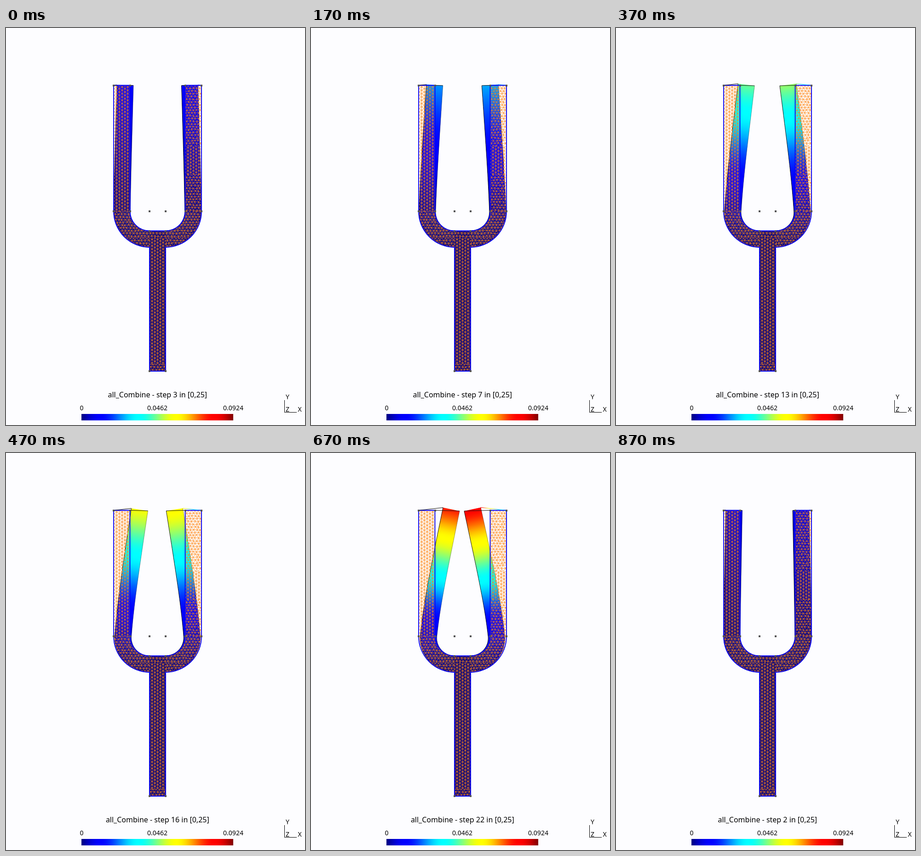
Recreate the animation shown at these times as an HTML page with a canvas. Size 650 by 862 pixels, loop 910 ms.

```html
<!DOCTYPE html>
<html>
<head>
<meta charset="utf-8">
<style>
  html, body { margin: 0; width: 100%; height: 100%; overflow: hidden; background: #fdfdff; }
  canvas { display: block; }
</style>
</head>
<body>
<canvas id="stage" width="650" height="862"></canvas>
<script>
const W = 650, H = 862, LOOP = 910, STEPS = 26;
const TOP = 124.5, BEND = 398, JOIN = 476.5, FOOT = 745, ARM = BEND - TOP;
const RADIUS = 60, HALF = 18, CENTER = 311.8, MIRROR = 659;
const LEFT_PEAK = 60.4, RIGHT_PEAK = 63.8, MAX_SHIFT = 64.5;
const ARM_SIDE = ARM / 38, STEM_SIDE = (FOOT - JOIN) / 38;
const FONT = '"Noto Sans", "Open Sans", sans-serif';
const ctx = document.getElementById('stage').getContext('2d');

// Jet colours with softened ramps, so that cyan and yellow form broad bands.
function jet(v) {
  const channel = peak => {
    const k = Math.max(0, Math.min(1, 1.5 - Math.abs(4 * v - peak)));
    return Math.round(255 * k * k * (3 - 2 * k));
  };
  return `rgb(${channel(3)},${channel(2)},${channel(1)})`;
}

function jetGradient(c, x0, x1, from, to) {
  const g = c.createLinearGradient(x0, 0, x1, 0);
  for (let i = 0; i <= 64; i++) g.addColorStop(i / 64, jet(from + (to - from) * i / 64));
  return g;
}

function line(c, points, color, width = 1) {
  c.beginPath();
  points.forEach(p => c.lineTo(...p));
  c.strokeStyle = color;
  c.lineWidth = width;
  c.stroke();
}

// A bending beam on a bending arc: q runs 0..1 along the arc and 1..2 up the
// arm; offset points inward.
function prong(q, offset, amp, right) {
  const BASE_TURN = 0.537, FLEX = 0.389;
  const bend = Math.min(q, 1), s = Math.max(q - 1, 0), a = bend * Math.PI / 2;
  const sin = Math.sin(a), cos = Math.cos(a);
  const sway = BASE_TURN * amp / ARM / (Math.PI / 2) * RADIUS;
  const beam = (6 * s ** 2 - 4 * s ** 3 + s ** 4) / 3;
  const slope = (12 * s - 12 * s ** 2 + 4 * s ** 3) / 3;
  const turn = amp / ARM * (BASE_TURN * bend + FLEX * slope);
  const ox = offset * sin, oy = -offset * cos;
  const ux = sway * (sin - a * cos) + amp * (BASE_TURN * s + FLEX * beam) - turn * oy;
  const uy = -sway * (a * sin + cos - 1) + turn * ox;
  const x = CENTER - RADIUS * sin + ox + ux;
  const y = BEND + RADIUS * cos - ARM * s + oy + uy;
  return { at: [right ? MIRROR - x : x, y], shift: Math.hypot(ux, uy) };
}

function drawProng(amp, right) {
  const at = (q, offset) => prong(q, offset, amp, right).at;
  const n = 240;
  for (let i = 0; i < n; i++) {
    const q0 = 2 * i / n, q1 = Math.min(2, q0 + 3 / n);
    ctx.beginPath();
    [[q0, -HALF], [q1, -HALF], [q1, HALF], [q0, HALF]].forEach(p => ctx.lineTo(...at(...p)));
    ctx.fillStyle = jet(prong(q0 + 1 / n, 0, amp, right).shift / MAX_SHIFT);
    ctx.fill();
  }
  const edge = offset => Array.from({ length: 61 }, (_, i) => at(i / 30, offset));
  const faint = 'rgba(0,0,0,.4)';
  line(ctx, edge(-HALF), right ? faint : '#000', 0.9);
  line(ctx, edge(HALF), right ? '#000' : faint, 0.9);
}

function drawTipLinks(amp, right) {
  for (const offset of [-HALF, HALF]) {
    const from = prong(2, offset, 0, right).at;
    const to = prong(2, offset, amp, right).at;
    const colored = right && offset < 0 && amp > 1;
    const color = colored
      ? jetGradient(ctx, to[0], from[0], amp / MAX_SHIFT, 0.2) : '#111';
    line(ctx, [from, to], color);
  }
}

function forkPath(c) {
  const l = 312, r = 347;
  c.beginPath();
  c.moveTo(234, TOP);
  c.lineTo(234, BEND);
  c.arc(l, BEND, 78, Math.PI, Math.PI / 2, true);
  c.lineTo(l, FOOT);
  c.lineTo(r, FOOT);
  c.lineTo(r, 476);
  c.arc(r, BEND, 78, Math.PI / 2, 0, true);
  c.lineTo(425, TOP);
  c.lineTo(389.5, TOP);
  c.lineTo(389.5, BEND);
  c.arc(r, BEND, 42.5, 0, Math.PI / 2);
  c.lineTo(l, 440.5);
  c.arc(l, BEND, 42.5, Math.PI / 2, Math.PI);
  c.lineTo(269.5, TOP);
  c.closePath();
}

function noise(n) {
  const v = Math.sin(n * 12.9898) * 43758.5453;
  return v - Math.floor(v) - 0.5;
}

// Triangle lattice filling a box, with its lines running down or across.
function lattice(c, x0, y0, x1, y1, { upright = false, jitter = 0, side = ARM_SIDE }) {
  const gap = 6;
  const [across, along] = upright ? [x1 - x0, y1 - y0] : [y1 - y0, x1 - x0];
  const node = (i, j) => {
    const seed = i * 71 + j * 13 + x0;
    const u = i * gap + jitter * noise(seed);
    const v = (j + (i & 1) / 2) * side + jitter * noise(seed + 0.37);
    return upright ? [x0 + u, y0 + v] : [x0 + v, y0 + u];
  };
  c.save();
  c.beginPath();
  c.rect(x0, y0, x1 - x0, y1 - y0);
  c.clip();
  c.beginPath();
  for (let i = 0; i <= across / gap + 1; i++) {
    for (let j = -1; j <= along / side + 1; j++) {
      const slanted = i & 1 ? j + 1 : j - 1;
      for (const other of [[i, j + 1], [i + 1, j], [i + 1, slanted]]) {
        c.moveTo(...node(i, j));
        c.lineTo(...node(...other));
      }
    }
  }
  c.strokeStyle = '#ff8614';
  c.lineWidth = 0.85;
  c.stroke();
  c.restore();
}

function makeOverlay() {
  const layer = document.createElement('canvas');
  layer.width = W;
  layer.height = H;
  const c = layer.getContext('2d');
  const rough = { jitter: 2.2 };
  const stemTop = JOIN - 3 * STEM_SIDE;
  c.save();
  forkPath(c);
  c.clip();
  lattice(c, 234.5, TOP, 270, BEND, { upright: true });
  lattice(c, 389.5, TOP, 425, 256, rough);
  lattice(c, 389.5, 256, 425, 318, { upright: true, jitter: 0.5 });
  lattice(c, 389.5, 318, 425, BEND, rough);
  lattice(c, 234, BEND, 425, stemTop, rough);
  lattice(c, 234, stemTop, 312, JOIN, rough);
  lattice(c, 347, stemTop, 425, JOIN, rough);
  lattice(c, 311.5, stemTop, 347.5, 730, { upright: true, side: STEM_SIDE });
  lattice(c, 311.5, 730, 347.5, FOOT, rough);
  c.restore();
  forkPath(c);
  c.strokeStyle = '#00f';
  c.lineWidth = 1.8;
  c.stroke();
  return layer;
}

function drawPoints() {
  ctx.fillStyle = '#555';
  const dot = (x, y) => ctx.fillRect(x - 2, y - 2, 4, 4);
  for (const x of [234, 270, 390, 425]) { dot(x, 125); dot(x, 398); }
  for (const x of [312, 347]) [398, 441, 745].forEach(y => dot(x, y));
}

function drawLegend(step) {
  const text = (str, x, y, size) => {
    ctx.font = `${size}px ${FONT}`;
    ctx.fillText(str, x, y);
  };
  ctx.fillStyle = '#000';
  ctx.textAlign = 'center';
  text(`all_Combine - step ${step} in [0,25]`, 329.3, 802, 16);
  text('0', 164.5, 830, 14);
  text('0.0462', 329, 830, 14);
  text('0.0924', 494, 830, 14);
  text('Y', 612, 806, 14);
  text('Z', 612, 833, 14);
  text('X', 638.5, 833, 14);
  line(ctx, [[605.5, 808], [605.5, 834.5], [632, 834.5]], '#000');
  ctx.fillStyle = jetGradient(ctx, 164, 494, 0, 1);
  ctx.fillRect(164, 838, 330, 14);
}

// The first picture holds 70 ms, then each 100 ms is split 30, 30, 40.
function stepAt(t) {
  if (t < 70) return 3;
  const u = t - 70;
  const k = 3 * Math.floor(u / 100) + Math.min(2, Math.floor(u % 100 / 30));
  return (4 + k) % STEPS;
}

const overlay = makeOverlay();

function draw(step) {
  const part = step / (STEPS - 1);
  const left = LEFT_PEAK * part, right = RIGHT_PEAK * part;
  ctx.fillStyle = '#fdfdff';
  ctx.fillRect(0, 0, W, H);
  drawProng(left, false);
  drawProng(right, true);
  ctx.fillStyle = jet(0);
  ctx.fillRect(311, 440.5, 37, FOOT - 440.5);
  ctx.drawImage(overlay, 0, 0);
  drawTipLinks(left, false);
  drawTipLinks(right, true);
  drawPoints();
  drawLegend(step);
}

const start = performance.now();
function tick() {
  draw(stepAt((performance.now() - start) % LOOP));
  requestAnimationFrame(tick);
}
tick();
</script>
</body>
</html>
```
